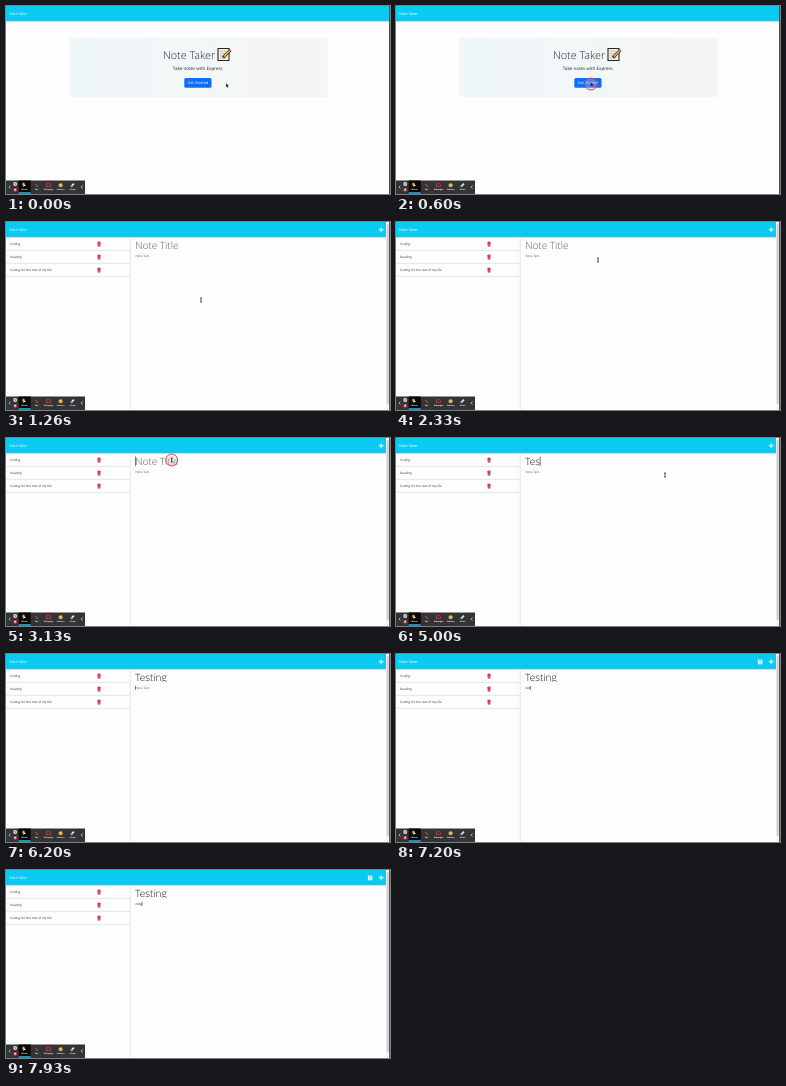
An HTML page for the animation above (8 s loop, 384 by 188 pixels).

```html
<!DOCTYPE html>
<html lang="en">
<head>
<meta charset="utf-8">
<style>
  html, body { margin: 0; height: 100%; overflow: hidden; background: #fdfdfd; }
  svg { display: block; width: 384px; height: 188px; text-rendering: geometricPrecision;
        font-family: "Open Sans", "Noto Sans", sans-serif; }
  .light { font-weight: 300; }
  .mid { text-anchor: middle; }
</style>
</head>
<body>
<svg viewBox="0 0 384 188">
  <defs>
    <linearGradient id="panel"><stop stop-color="#f0f7fa"/><stop offset="1" stop-color="#f4f6f3"/></linearGradient>
    <clipPath id="titleBox"><path d="M125 16h250v12.1h-250z"/></clipPath>
  </defs>
  <rect width="384" height="188" fill="#fdfdfd"/>
  <rect id="header" width="383" height="15.3" fill="#0bcaf2"/>
  <text x="3" y="9.4" font-size="3.75" fill="#fff">Note Taker</text>

  <g id="landing">
    <path d="M383.5 0v188" stroke="#454b4e"/>
    <rect x="63" y="32" width="258.5" height="59" fill="url(#panel)"/>
    <text class="light" x="157" y="52.5" font-size="10.8" fill="#212529">Note Taker</text>
    <g transform="translate(211 41)">
      <path d="M1 1.5h11v12H1z" fill="#f4eee4" stroke="#25282b" stroke-width="1.1"/>
      <path d="M3 4.2h6M3 6.5h5M3 8.8h3M3 11h6" stroke="#a9a49c" stroke-width=".6"/>
      <path d="M6 10.5 13.5 3" stroke="#25282b" stroke-width="3"/>
      <path d="M6.8 9.7 12.5 4" stroke="#f2b63c" stroke-width="1.7"/>
      <path d="M12.4 4.1 13.5 3" stroke="#e2707c" stroke-width="1.8"/>
    </g>
    <text class="mid" x="191.8" y="64.3" font-size="4.5" font-weight="500" fill="#212529">Take notes with Express</text>
    <rect x="178.3" y="71.9" width="27.2" height="9.8" rx="1.5" fill="#0d6efd"/>
    <text class="mid" x="191.9" y="78.3" font-size="3.9" fill="#fff">Get Started</text>
  </g>

  <g id="notes">
    <path d="M380 0h4v188h-4z" fill="#f3f3f3"/>
    <path d="M380.8 2.5h1.9v179h-1.9z" fill="#c9c9c9"/>
    <path d="M383.5 0v188" stroke="#55595b"/>
    <path d="M375.2 5.4v4.8M372.8 7.8h4.8" stroke="#fff" stroke-width="1.1"/>
    <g id="save">
      <path d="M361.9 5.5h3.4l1 1v3.7h-4.4z" fill="#fff"/>
      <path d="M362.7 6.2h2.2v1h-2.2z" fill="#0bcaf2"/><circle cx="364.1" cy="8.8" r=".7" fill="#0bcaf2"/>
    </g>
    <path d="M124.3 15.3V188" stroke="#dedede" stroke-width=".7"/>
    <g id="list"></g>
    <g clip-path="url(#titleBox)"><text id="title" class="light" x="129.3" y="27.3" font-size="10"></text></g>
    <text id="body" x="129.4" y="35.1" font-size="3.1"></text>
    <path id="caret" stroke="#222" stroke-width=".6"/>
  </g>

  <g id="toolbar">
    <rect y="174.5" width="79" height="13.5" fill="#333436"/>
    <rect x="12.7" y="174.5" width="12" height="13.5" fill="#080808"/>
    <path d="M12.7 187h12" stroke="#18b6e8" stroke-width="1.6"/>
    <path d="M4.4 179.5 3 181l1.4 1.5M76.6 179.3 75 181l1.6 1.7" fill="none" stroke="#ddd" stroke-width=".7"/>
    <circle cx="9.2" cy="178" r="1.9" fill="#eee"/><circle cx="9.2" cy="178" r=".8" fill="#555"/>
    <circle cx="9.2" cy="183.7" r="1.9" fill="#d9414b"/><path d="M8.5 183h1.4v1.4H8.5z" fill="#fff"/>
    <path d="m17.2 177 .2 4 1-1 1.5.1z" fill="#fff"/><circle cx="17.4" cy="178" r="1.5" fill="#f2b632" opacity=".7"/>
    <path d="m29 177.8 3 3" stroke="#df3744" stroke-width="1.2"/>
    <rect x="40.6" y="177.8" width="4" height="3" fill="none" stroke="#df3744" stroke-width=".7"/>
    <circle cx="54.6" cy="179.2" r="2" fill="#f3c43c"/><path d="M53.6 179.7q1 1 2 0" fill="none" stroke="#6a4a10" stroke-width=".4"/>
    <path d="m65 180.6 3-3" stroke="#e9dfee" stroke-width="1.7"/><path d="m65 180.6 1-1" stroke="#c58bc8" stroke-width="1.7"/>
  </g>

  <circle id="ring" r="6" fill="#e9b7bd" fill-opacity=".3" stroke="#cf4d5d" stroke-width="1"/>
  <path id="arrow" d="M-.4-1.8v4l1-.8.7 1.3.6-.3-.6-1.3 1.2-.1z" fill="#3a1747"/>
  <path id="beam" d="M-1-1.9H1M0-1.9V1.9M-1 1.9H1" fill="none" stroke="#351c24" stroke-width=".75"/>
</svg>
<script>
const LOOP = 8000, PAGE_SWITCH = 640, TITLE_FOCUS = 3060, BODY_FOCUS = 6060, BLINK = 530;
const titleKeys = [4600, 4730, 5000, 5220, 5420, 5560, 5740];
const bodyKeys = [6730, 6930, 7200, 7600];
const clicks = [[400, 640], [3000, 3330]];
// time, x, y of the pointer
const path = [[0, 220.5, 79], [60, 220.5, 79], [400, 195, 78], [1260, 195, 78], [1800, 249, 50], [1860, 249, 50],
  [2330, 202, 38], [2600, 196, 36], [2860, 196, 36], [3080, 165.7, 22], [3330, 165.7, 22],
  [3660, 190, 27], [3730, 190, 27], [4130, 269, 37]];
const POINTER_HIDES = 5220;

const $ = id => document.getElementById(id);
const show = (id, on) => $(id).style.display = on ? "" : "none";

$("list").innerHTML = ["Coding", "Reading", "Coding for the rest of my life"].map((note, i) => `
  <g transform="translate(0 ${i * 13})">
    <text x="4" y="23.2" font-size="3.15" fill="#333">${note}</text>
    <path d="M91.2 20.5h3.6M92.3 19.8h1.4" stroke="#d32945" stroke-width=".8"/>
    <path d="M91.5 21.1h3l-.2 3.4h-2.6z" fill="#d32945"/>
    <path d="M92.5 21.6v2.4M93.5 21.6v2.4" stroke="#f1a5b0" stroke-width=".3"/>
    <path d="M0 28.4h124" stroke="#dedede" stroke-width=".7"/>
  </g>`).join("");

$("toolbar").innerHTML += ["Mouse", "Pen", "Rectangle", "Stickers", "Eraser"].map((label, i) =>
  `<text class="mid" x="${18.6 + i * 12}" y="184.3" font-size="1.9" font-weight="700" fill="#fff">${label}</text>`).join("");

function pointerAt(t) {
  const next = path.findIndex(p => p[0] > t);
  if (next < 0) return path.at(-1).slice(1);
  const [t0, x0, y0] = path[next - 1], [t1, x1, y1] = path[next];
  const u = (t - t0) / (t1 - t0), k = u * u * (3 - 2 * u);
  return [x0 + (x1 - x0) * k, y0 + (y1 - y0) * k];
}

function fillField(id, text, placeholder, keys, t) {
  const typed = text.slice(0, keys.filter(k => k <= t).length);
  const field = $(id);
  field.textContent = typed || placeholder;
  field.setAttribute("fill", typed ? "#111" : "#555b60");
  return typed ? field.getComputedTextLength() : 0;
}

function draw(t) {
  const onNotes = t >= PAGE_SWITCH, inBody = t >= BODY_FOCUS;
  show("landing", !onNotes);
  show("notes", onNotes);
  $("header").setAttribute("width", onNotes ? 380 : 383);
  show("save", t >= bodyKeys[0]);

  const titleWidth = fillField("title", "Testing", "Note Title", titleKeys, t);
  const bodyWidth = fillField("body", "noty", "Note Text", bodyKeys, t);
  const lastInput = Math.max(0, ...[TITLE_FOCUS, BODY_FOCUS, ...titleKeys, ...bodyKeys].filter(k => k <= t));
  show("caret", t >= TITLE_FOCUS && (t - lastInput) % (2 * BLINK) < BLINK);
  $("caret").setAttribute("d", inBody ? `M${129.5 + bodyWidth} 32v3.8` : `M${129.5 + titleWidth} 18.5v9.5`);

  const place = `translate(${pointerAt(t)})`;
  for (const id of ["arrow", "beam", "ring"]) $(id).setAttribute("transform", place);
  show("arrow", !onNotes);
  show("beam", onNotes && t < POINTER_HIDES);
  show("ring", clicks.some(([from, to]) => t >= from && t < to));
}

function tick() {
  draw(performance.now() % LOOP);
  requestAnimationFrame(tick);
}
tick();
</script>
</body>
</html>
```
